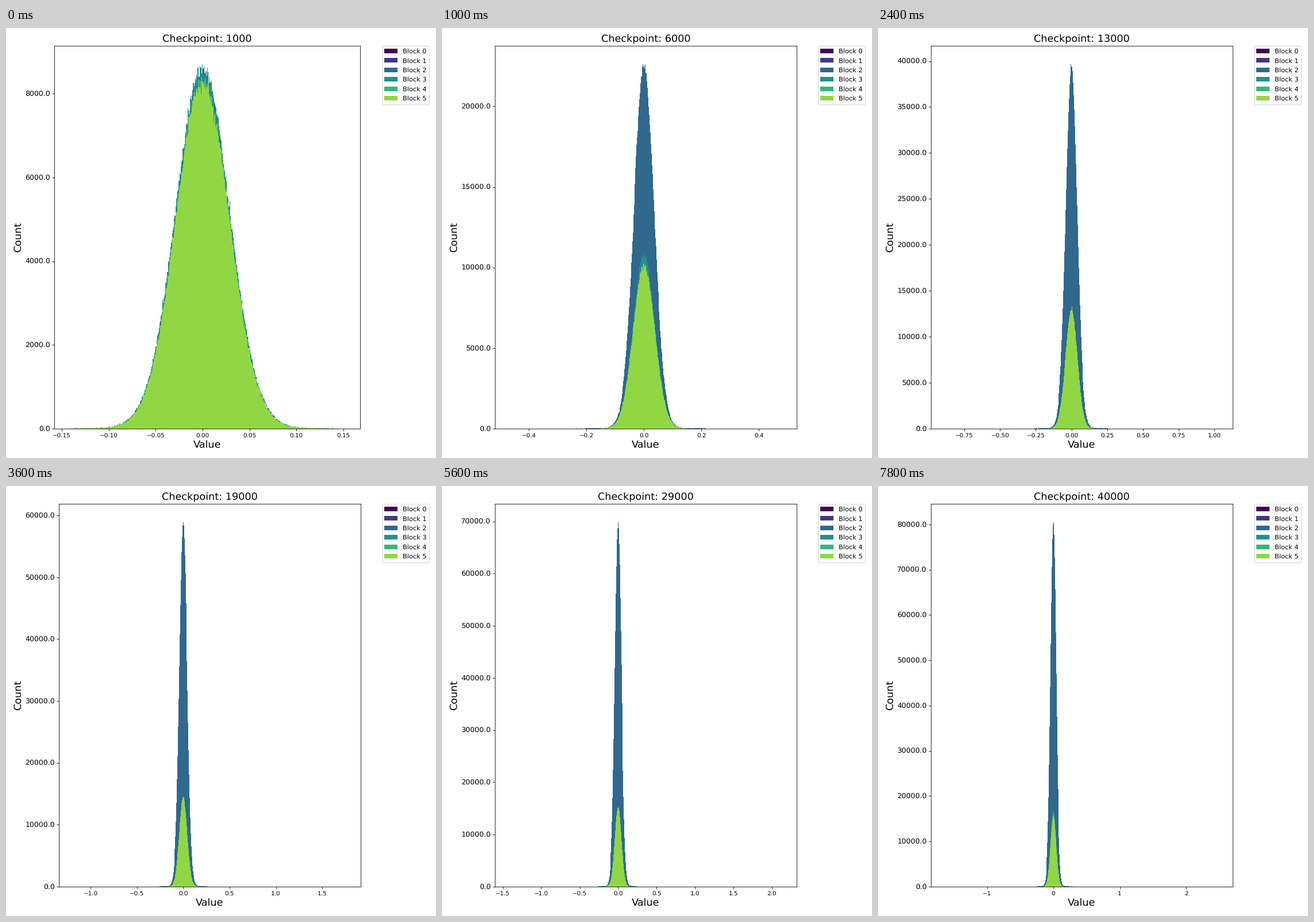
These frames come from a looping animation (748x748 px, 8 s). A matplotlib script:

```python
import numpy as np
import matplotlib
import matplotlib.pyplot as plt
from matplotlib.animation import FuncAnimation
from matplotlib.patches import Patch

INCHES, DPI = 10, 74.8
SIZE = INCHES * DPI
FRAMES, INTERVAL = 40, 200
BINS, WEIGHTS = 500, 1.04e6
ROOT_TAU = np.sqrt(2 * np.pi)
TOP, BOTTOM = 31.2, 697

# Value range at a few checkpoints: thousands of steps, lower and upper limit
RANGE_KEYS = [(1, -.158, .168), (4, -.312, .269), (9, -.772, .853),
              (13, -.984, 1.129), (19, -1.341, 1.914), (40, -1.844, 2.701)]
KEY_STEPS, LOWS, HIGHS = zip(*RANGE_KEYS)
COLORS = [matplotlib.colormaps["viridis"](i / 6) for i in range(6)]

plt.rcParams.update({"font.family": "DejaVu Sans", "text.hinting": "none"})
fig = plt.figure(figsize=(INCHES, INCHES), dpi=DPI, facecolor="white")
ax = fig.add_subplot()
fig.legend(
    handles=[Patch(color=c, label=f"Block {i}", lw=0) for i, c in enumerate(COLORS)],
    loc="upper left", bbox_to_anchor=(653.7 / SIZE, 1 - TOP / SIZE),
    borderaxespad=0, fontsize=11,
)


def settle(step, start, end, scale, power=1):
    """Ease from start towards end as training goes on."""
    return end + (start - end) * np.exp(-(step / scale)**power)


def value_range(step):
    root, keys = np.sqrt(step), np.sqrt(KEY_STEPS)
    return np.interp(root, keys, LOWS), np.interp(root, keys, HIGHS)


def histogram(edges, sigma, tail, peak, rng):
    """Bell-shaped counts with a faint wide tail and sampling noise."""
    z = (edges[:-1] + edges[1:]) / 2 / sigma
    wide = .04 / tail**2
    bell = (1 - wide) * np.exp(-z**2 / 2) + wide * np.exp(-(z / tail)**2 / 2)
    return rng.poisson(peak * bell)


def widest_block(step, low, high):
    """Block 2 spans the whole range, which sets its bin width and height."""
    margin = (high - low) / 22
    edges = np.linspace(low + margin, high - margin, BINS + 1)
    sigma = settle(step, .0277, .0425, 8, 1.3)
    peak = WEIGHTS * (edges[1] - edges[0]) / (sigma * ROOT_TAU)
    return edges, sigma, settle(step, 1, 4, 4), peak


def narrow_block(step, ratio, rng):
    sigma = settle(step, .0255, .043, 5)
    peak = ratio * settle(step, 8150, 15600, 12.5, 1.6)
    width = peak * sigma * ROOT_TAU / WEIGHTS
    edges = width * (np.arange(BINS + 1) - BINS / 2 - rng.random())
    return edges, sigma, 2, peak


def draw(frame):
    step = frame + 1
    low, high = value_range(step)
    ratios = {
        3: .96 + .13 * np.exp(-((step - 4) / 4)**2),
        4: .97 + .1 * (step / FRAMES)**4,
        5: 1,
    }
    top = 0

    ax.clear()
    for block in range(2, 6):
        rng = np.random.default_rng(100 * step + block)
        if block == 2:
            shape = widest_block(step, low, high)
        else:
            shape = narrow_block(step, ratios[block], rng)
        counts = histogram(*shape, rng)
        ax.stairs(counts, shape[0], fill=True, color=COLORS[block], lw=0, snap=True)
        top = max(top, 1.05 * counts.max())

    # Five-digit tick labels push the plot area to the right
    x0, x1 = (92.1, 617) if top >= 10000 else (84.2, 616.2)
    ax.set_position([x0 / SIZE, 1 - BOTTOM / SIZE,
                     (x1 - x0) / SIZE, (BOTTOM - TOP) / SIZE])
    ax.set_xlim(low, high)
    ax.set_ylim(0, top)
    ax.yaxis.set_major_formatter(lambda v, _: f"{v:.1f}")
    ax.tick_params(axis="y", labelsize=12)
    ax.set_title(f"Checkpoint: {1000 * step}", fontsize=17)
    ax.set_xlabel("Value", fontsize=17)
    ax.set_ylabel("Count", fontsize=17)


anim = FuncAnimation(fig, draw, frames=FRAMES, interval=INTERVAL,
                     init_func=lambda: None, repeat=True, repeat_delay=0)
plt.show()
```
